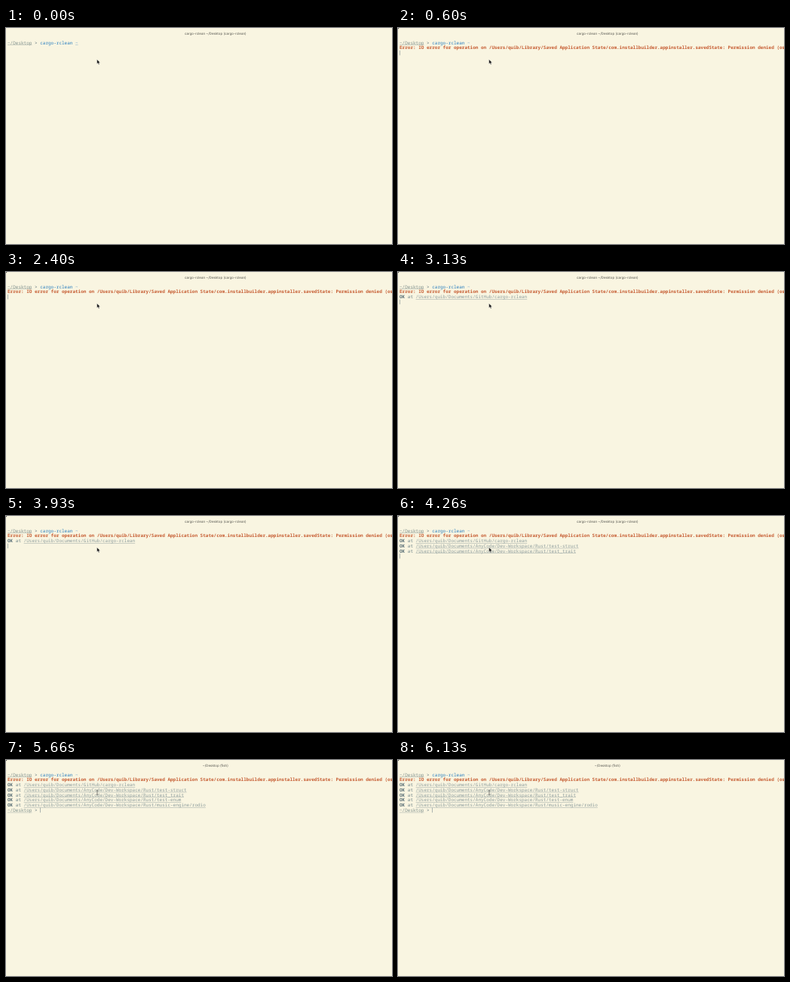
Recreate the animation shown at these times as an HTML page. Size 512x288 px, loop 6200 ms.

```html
<!DOCTYPE html>
<html lang="en">
<head>
<meta charset="utf-8">
<title>Terminal</title>
<style>
html, body { margin: 0; width: 100%; height: 100%; overflow: hidden; background: #f9f5e1; }
svg { display: block; width: 512px; height: 288px; }
text { text-rendering: geometricPrecision; white-space: pre; }
.mono { font: 6px "Noto Sans Mono", "Liberation Mono", monospace; }
.title { font: 4.45px Inter, "Open Sans", sans-serif; fill: #55554f; text-anchor: middle; }
.bold { font-weight: 700; }
</style>
</head>
<body>
<svg id="stage" viewBox="0 0 512 288">
  <path id="corner" d="M0 0H1.6Q.3 .3 0 1.6Z"/>
  <text id="title" class="title" x="277.8" y="9.1"></text>
  <g id="screen" class="mono"></g>
  <rect id="caret" width=".7" height="6.5" fill="#8b999b"/>
  <path id="arrow" d="M120.7 42V47.8L122 46.6L122.9 48.7L123.9 48.3L123 46.2H124.8Z" fill="#111" stroke="#fff" stroke-width=".3"/>
  <path id="beam" d="M119.8 40.6Q121 40.6 121 41.4Q121 40.6 122.2 40.6M121 41.2V45.8M119.8 46.4Q121 46.4 121 45.6Q121 46.4 122.2 46.4" fill="none" stroke="#444" stroke-width=".6"/>
</svg>
<script>
const LOOP = 6200, LEFT = 2, CHAR = 3.6, ROW = 6.75;
const DONE = 5600;
const $ = id => document.getElementById(id);
const items = [];

function add(tag, attrs, from, to) {
  const el = document.createElementNS("http://www.w3.org/2000/svg", tag);
  for (const key in attrs) el.setAttribute(key, attrs[key]);
  $("screen").append(el);
  items.push({ el, from, to });
  return el;
}

function write(row, col, str, fill, from, bold) {
  add("text", {
    x: LEFT + col * CHAR, y: 21.5 + row * ROW, fill, class: bold ? "bold" : ""
  }, from, LOOP).textContent = str;
}

function underline(row, col, length, fill, from, to = LOOP) {
  add("rect", {
    x: LEFT + col * CHAR, y: 22.5 + row * ROW, width: length * CHAR, height: .5, fill
  }, from, to);
}

function prompt(row, from) {
  write(row, 0, "~/Desktop", "#849490", from);
  underline(row, 0, 9, "#98a49e", from);
  write(row, 10, ">", "#586e75", from);
}

function ok(row, path, from) {
  const full = "/Users/quib/Documents/" + path;
  write(row, 0, "OK", "#586e75", from, true);
  write(row, 3, "at", "#71858a", from);
  write(row, 6, full, "#8e9d9d", from);
  underline(row, 6, full.length, "#98a5a2", from);
}

prompt(0, 0);
write(0, 12, "cargo-rclean", "#2c80c0", 0);
write(0, 25, "~", "#78a8c8", 0);
underline(0, 25, 1, "#8cb3c8", 0, 600);
write(1, 0, "Error: IO error for operation on /Users/quib/Library/Saved Application State/" +
  "com.installbuilder.appinstaller.savedState: Permission denied (os error 13)", "#c65c32", 600, true);
const work = "AnyCode/Dev-Workspace/Rust/";
ok(2, "GitHub/cargo-rclean", 2600);
ok(3, work + "test-struct", 4000);
ok(4, work + "test_trait", 4000);
ok(5, work + "test-enum", 4400);
ok(6, work + "music-engine/rodio", 4400);
prompt(7, DONE);

// [start time, row, column]
const carets = [[60, 1, 0], [600, 2, 0], [2600, 3, 0], [4000, 5, 0], [4400, 7, 0], [DONE, 7, 12]];

const show = (el, on) => el.setAttribute("visibility", on ? "visible" : "hidden");

function draw(now) {
  const t = now % LOOP, done = t >= DONE;
  for (const { el, from, to } of items) show(el, t >= from && t < to);
  const caret = carets.filter(c => t >= c[0]).pop();
  show($("caret"), caret);
  if (caret) {
    $("caret").setAttribute("x", LEFT + .1 + caret[2] * CHAR);
    $("caret").setAttribute("y", 16.4 + caret[1] * ROW);
  }
  show($("corner"), t >= 60);
  show($("arrow"), !done);
  show($("beam"), done);
  $("title").textContent = done ? "~/Desktop (fish)" : "cargo-rclean ~/Desktop (cargo-rclean)";
}

const start = performance.now();
function tick() {
  draw(performance.now() - start);
  requestAnimationFrame(tick);
}
tick();
</script>
</body>
</html>
```
